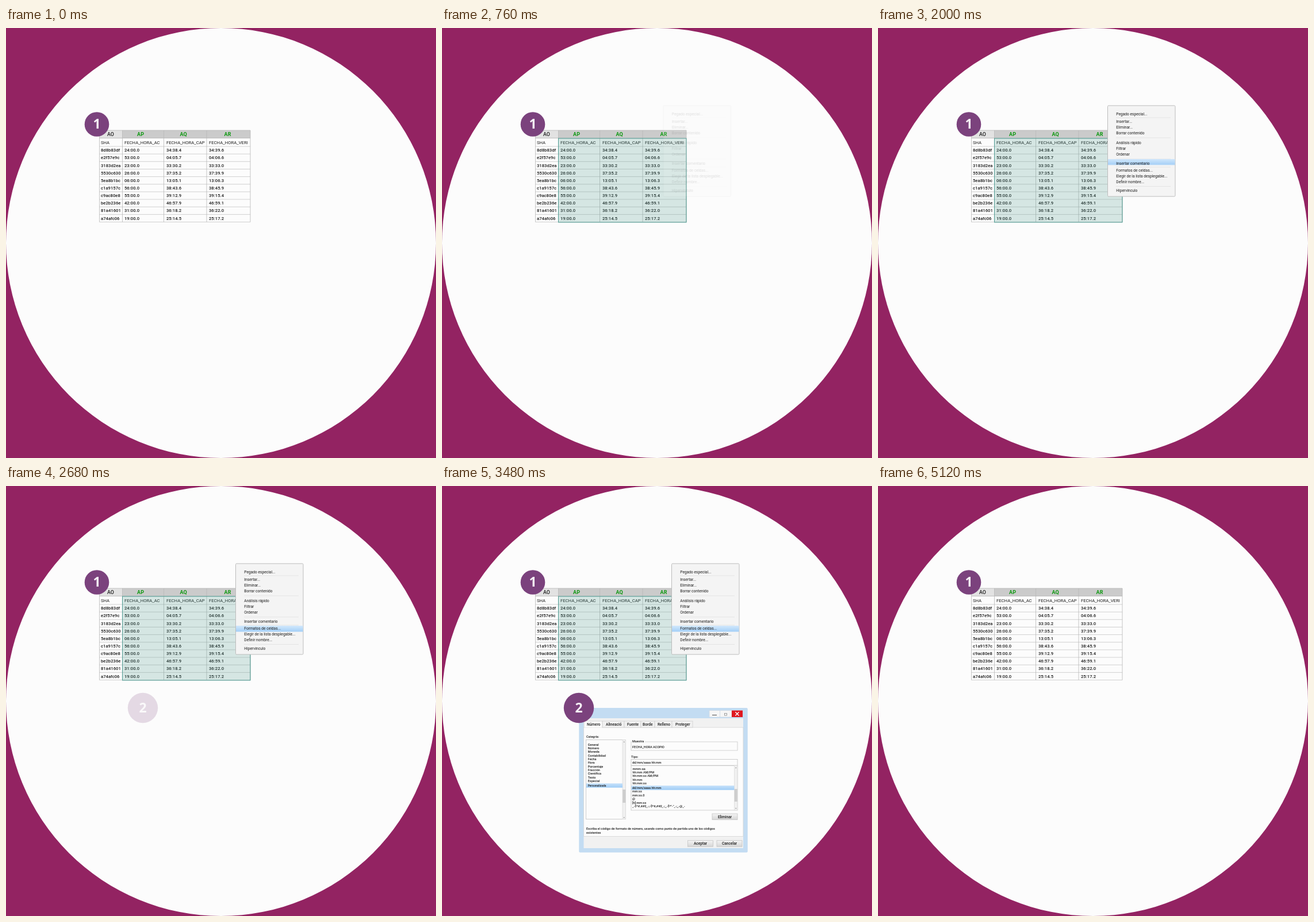
Recreate the animation shown at these times as an HTML page with a canvas. Size 748 by 748 pixels, loop 6 s.

```html
<!DOCTYPE html>
<html lang="es">
<head>
<meta charset="utf-8">
<title>Formato de celdas</title>
<style>
html, body { margin: 0; width: 100%; height: 100%; overflow: hidden; background: #932362; }
canvas { display: block; }
</style>
</head>
<body>
<canvas id="stage" width="748" height="748"></canvas>
<script>
const SIZE = 748, LOOP = 6000, STEP = 40;
const ctx = document.getElementById('stage').getContext('2d');

function layer(paint) {
  const c = document.createElement('canvas');
  c.width = c.height = SIZE;
  paint(c.getContext('2d'));
  return c;
}

function text(g, str, x, y, size, { weight = 500, color = '#1c1c1c', align = 'left', family = 'Roboto' } = {}) {
  g.font = `${weight} ${size}px ${family}, sans-serif`;
  g.fillStyle = color;
  g.textAlign = align;
  g.textBaseline = 'alphabetic';
  g.fillText(str, x, y + size * 0.36);
}

function rect(g, x, y, w, h, fill, stroke) {
  if (fill) { g.fillStyle = fill; g.fillRect(x, y, w, h); }
  if (stroke) { g.strokeStyle = stroke; g.lineWidth = 0.8; g.strokeRect(x, y, w, h); }
}

function line(g, x1, y1, x2, y2, color, width = 0.8) {
  g.strokeStyle = color;
  g.lineWidth = width;
  g.beginPath();
  g.moveTo(x1, y1);
  g.lineTo(x2, y2);
  g.stroke();
}

function shade(g, y, h, top, bottom) {
  const grad = g.createLinearGradient(0, y, 0, y + h);
  grad.addColorStop(0, top);
  grad.addColorStop(1, bottom);
  return grad;
}

function badge(g, x, y, r, digit) {
  g.fillStyle = '#7b427d';
  g.beginPath();
  g.arc(x, y, r, 0, Math.PI * 2);
  g.fill();
  text(g, digit, x, y - 0.5, 23, { weight: 700, color: '#f6f1f6', align: 'center', family: '"Open Sans"' });
}

function button(g, x, y, label) {
  rect(g, x, y, 44, 10.5, shade(g, y, 10.5, '#f4f4f4', '#d6d6d6'), '#c4c4c4');
  text(g, label, x + 22, y + 5.2, 6.6, { align: 'center' });
}

function scrollbar(g, x, y, h, thumbY, thumbH) {
  rect(g, x, y, 5.5, h, '#f0f0f0', '#dcdcdc');
  rect(g, x + 0.3, thumbY, 4.9, thumbH, '#cdcdcd');
  text(g, '▴', x + 2.75, y + 3, 4, { color: '#888', align: 'center' });
  text(g, '▾', x + 2.75, y + h - 3, 4, { color: '#888', align: 'center' });
}

const base = layer(g => {
  rect(g, 0, 0, SIZE, SIZE, '#932362');
  g.fillStyle = '#fcfcfc';
  g.beginPath();
  g.arc(374, 374, 374, 0, Math.PI * 2);
  g.fill();

  const edges = [162.5, 202.5, 274.5, 349, 425];
  const rowY = i => 206 + 13.15 * i;
  rect(g, 162.5, 178, 40, 13.5, '#e2e2e2');
  rect(g, 202.5, 178, 222.5, 13.5, '#cbcbcb');
  line(g, 162.5, 178, 425, 178, '#b4b4b4');
  line(g, 162.5, 191.5, 425, 191.5, '#b4b4b4');
  for (let i = 0; i <= 10; i++) line(g, 162.5, rowY(i), 425, rowY(i), '#c6c6c6');
  for (const x of edges) line(g, x, 178, x, rowY(10), '#b8b8b8');

  const green = { weight: 700, color: '#0c980f', align: 'center' };
  text(g, 'AO', 182, 185, 8.8, { align: 'center' });
  text(g, 'AP', 234, 185, 9, green);
  text(g, 'AQ', 308.5, 185, 9, green);
  text(g, 'AR', 385.5, 185, 9, green);

  const rows = [
    'SHA FECHA_HORA_AC FECHA_HORA_CAP FECHA_HORA_VERI',
    '8d8b83df 24:00.0 34:38.4 34:39.6',
    'e2f57e9c 53:00.0 04:05.7 04:06.6',
    '3183d2ea 23:00.0 33:30.2 33:33.0',
    '5530c630 26:00.0 37:35.2 37:39.9',
    '5ea8b1bc 06:00.0 13:05.1 13:06.3',
    'c1a9157c 56:00.0 38:43.6 38:45.9',
    'c9ac80e8 55:00.0 39:12.9 39:15.4',
    'be2b236e 42:00.0 46:57.9 46:59.1',
    '81a41601 31:00.0 36:18.2 36:22.0',
    'a74afc06 19:00.0 25:14.5 25:17.2'
  ];
  const left = [165, 206, 279, 353];
  rows.forEach((row, i) => row.split(' ').forEach((cell, j) =>
    text(g, cell, left[j], i ? rowY(i - 1) + 6.5 : 199.5, 7.7, { weight: i ? 500 : 400 })));
  badge(g, 158, 167.5, 21.3, '1');
});

const selection = layer(g => {
  rect(g, 202.5, 192, 222.5, 146, 'rgba(80,157,143,0.22)');
  g.strokeStyle = '#4f9a92';
  g.lineWidth = 1;
  g.strokeRect(202.5, 192, 222.5, 146);
});

const menuBox = layer(g => {
  g.beginPath();
  g.roundRect(399.5, 135, 117.5, 158, 1.5);
  g.fillStyle = '#f4f4f4';
  g.fill();
  g.strokeStyle = '#bcbcbc';
  g.lineWidth = 1;
  g.stroke();
  for (const y of [156, 191, 228, 242, 275.5]) line(g, 414, y, 509, y, '#dedede', 0.7);
});

const menuText = layer(g => {
  const items = {
    149.5: 'Pegado especial...', 162.7: 'Insertar...', 172.7: 'Eliminar...', 182.8: 'Borrar contenido',
    199.2: 'Análisis rápido', 209.3: 'Filtrar', 219.3: 'Ordenar', 236: 'Insertar comentario',
    248: 'Formatos de celdas...', 258: 'Elegir de la lista desplegable...', 268: 'Definir nombre...',
    282.4: 'Hipervínculo'
  };
  for (const y in items) text(g, items[y], 414.3, +y, 6.65, { weight: 400 });
});

const marker = layer(g => rect(g, 400, 0, 116.6, 10.5, shade(g, 0, 10.5, '#d2e8fc', '#a3cff7')));

const badgeTwo = layer(g => badge(g, 238, 386, 26.2, '2'));

const dialog = layer(g => {
  g.beginPath();
  g.roundRect(238.3, 386, 293.4, 251.5, 2);
  g.fillStyle = '#c3dcf2';
  g.fill();
  rect(g, 246.5, 404, 277.5, 226, '#f1f1f1');
  rect(g, 246.5, 420, 277.5, 189.5, '#fcfcfc', '#d5d5d5');

  // Window buttons
  rect(g, 465, 390.5, 18.5, 11.5, '#f6f6f6', '#d0dae4');
  rect(g, 483.5, 390.5, 20.5, 11.5, '#f6f6f6', '#d0dae4');
  rect(g, 504, 390.5, 19, 11.5, '#df1820');
  line(g, 470, 398.5, 478, 398.5, '#555', 1.1);
  rect(g, 491.5, 395.5, 4, 3.5, null, '#8a8a8a');
  line(g, 510.3, 393.2, 516.5, 399.4, '#fff', 1.4);
  line(g, 516.5, 393.2, 510.3, 399.4, '#fff', 1.4);

  // Tabs
  const tabs = [[247, 'Número', 252], [279, 'Alineació', 285], [317, 'Fuente', 322],
    [346, 'Borde', 349], [370, 'Relleno', 375], [400, 'Proteger', 406], [436]];
  tabs.slice(0, -1).forEach(([x, label, tx], i) => {
    rect(g, x, 409, tabs[i + 1][0] - x, 11, i ? '#f1f1f1' : '#fcfcfc', '#cfcfcf');
    text(g, label, tx, 414.7, 6.6);
  });
  line(g, 247.5, 420, 278.5, 420, '#fcfcfc', 1.2);

  const small = (str, x, y, size = 5.5) => text(g, str, x, y, size);
  const picked = (x, y, w, h) => rect(g, x, y, w, h, shade(g, y, h, '#c6e1fa', '#9fcdf6'));

  // Categories
  small('Categría:', 251, 435.7);
  rect(g, 250.5, 441.5, 69, 138, '#fcfcfc', '#c2c2c2');
  scrollbar(g, 314, 441.5, 138, 528, 23);
  'General Número Moneda Contabilidad Fecha Hora Porcentaje Fracción Científica Texto Especial'
    .split(' ').forEach((s, i) => small(s, 253.7, 449.7 + i * 6.35));
  picked(251, 517.3, 63, 7.4);
  small('Personalizada', 253.7, 521, 5);

  // Sample and format code
  rect(g, 329, 445, 185, 15, null, '#c9c9c9');
  rect(g, 330, 442, 23, 5, '#fcfcfc');
  small('Muestra', 331, 444.3);
  small('FECHA_HORA ACOPIO', 331, 454.3);
  small('Tipo:', 329, 471);
  rect(g, 329, 475.5, 185, 10.7, null, '#c2c2c2');
  small('dd/mm/aaaa hh:mm', 331, 480.8);
  rect(g, 329, 486.2, 185, 77.8, null, '#c2c2c2');
  scrollbar(g, 508.5, 486.2, 77.8, 527, 22);
  picked(329.4, 521.2, 179, 7.6);
  ['mmm-aa', 'hh:mm AM/PM', 'hh:mm:ss AM/PM', 'hh:mm', 'hh:mm:ss']
    .forEach((s, i) => small(s, 331.5, 491.8 + i * 6.35));
  ['dd/mm/aaaa hh:mm', 'mm:ss', 'mm:ss.0', '@', '[h]:mm:ss', '_-$*#,##0_-;-$*#,##0_-;_-$*"-"_-;_-@_-']
    .forEach((s, i) => small(s, 331, 525 + i * 6.4));

  button(g, 470, 570, 'Eliminar');
  small('Escriba el código de formato de número, usando como punto de partida uno de los códigos', 251, 595.8);
  small('existentes', 251, 602.8);
  button(g, 427.5, 616.7, 'Aceptar');
  button(g, 478, 616.7, 'Cancelar');
});

const ramp = (t, from, to) => Math.min(1, Math.max(0, (t - from) / (to - from)));
const outQuad = u => 1 - (1 - u) * (1 - u);
const outSine = u => Math.sin(u * Math.PI / 2);

function put(img, alpha, dx = 0, dy = 0) {
  if (alpha <= 0) return;
  ctx.globalAlpha = alpha;
  ctx.drawImage(img, dx, dy);
}

function draw(t) {
  const fade = 1 - ramp(t, 4880, 5120);
  put(base, 1);

  const sel = ramp(t, 40, 520);
  put(selection, sel * fade, 0, -14 * (1 - sel));

  const menu = outQuad(ramp(t, 720, 1360));
  const menuX = -16.5 * (1 - menu);
  put(menuBox, menu * fade, menuX);
  const sweep = outSine(ramp(t, 1360, 2360));
  put(marker, ramp(t, 1360, 1560) * fade, 0, 144 + 99 * sweep);
  put(menuText, menu * fade, menuX);

  const win = ramp(t, 3040, 3480);
  put(dialog, win * fade, 0, -23.3 * (1 - win));
  put(badgeTwo, ramp(t, 2600, 3040) * fade);
}

function tick() {
  const t = performance.now() % LOOP;
  draw(Math.floor(t / STEP) * STEP);
  requestAnimationFrame(tick);
}
tick();
</script>
</body>
</html>
```
